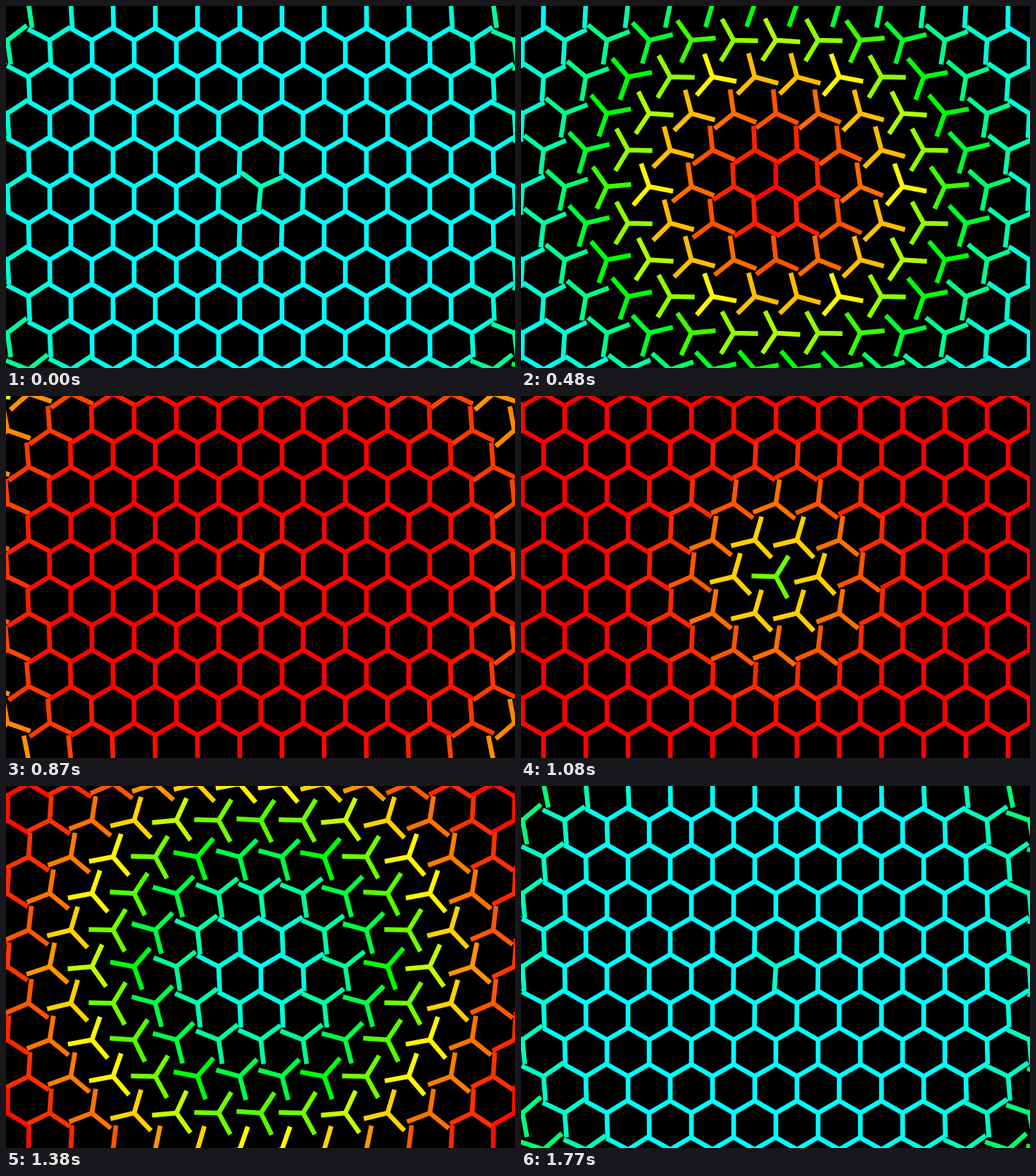
An HTML page with a canvas for the animation above (1800 ms loop, 699 by 497 pixels).

```html
<!DOCTYPE html>
<html lang="en">
<head>
<meta charset="utf-8">
<title>Hexagon wave</title>
<style>
  html, body { margin: 0; width: 100%; height: 100%; overflow: hidden; background: #000; }
  canvas { display: block; }
</style>
</head>
<body>
<canvas id="stage" width="699" height="497"></canvas>
<script>
const ctx = document.getElementById('stage').getContext('2d');
const W = 699, H = 497, CX = 350, CY = 248;
const GAP = 58, ROW = GAP * Math.sqrt(3) / 2, ARM = GAP / Math.sqrt(3);
const STEP = 30, STEPS = 60;
const START = 5.75;   // steps until the centre is halfway through its turn
const DELAY = 0.048;  // steps of lag per pixel from the centre

const ease = q => q < 0.5 ? 2 * q * q : 1 - 2 * (1 - q) * (1 - q);

const tripods = [];
for (let row = -6; row <= 6; row++) {
  const shift = row % 2 ? GAP / 2 : 0;
  for (let col = -8; col <= 8; col++) {
    const x = col * GAP + shift, y = row * ROW;
    tripods.push({ x, y, lag: START + DELAY * Math.hypot(x, y) });
  }
}

function drawTripod({ x, y, lag }, step) {
  const phase = 2 * Math.PI * (step - lag) / STEPS;
  const level = ease(0.5 + 0.5 * Math.sin(phase));
  const rising = Math.cos(phase) > 0;
  const turn = (rising ? level : 2 - level) * Math.PI / 3;

  ctx.strokeStyle = `hsl(${180 * (1 - level)}, 100%, 50%)`;
  ctx.beginPath();
  for (let i = 0; i < 3; i++) {
    const a = Math.PI / 2 + turn + i * 2 * Math.PI / 3;
    ctx.moveTo(CX + x, CY + y);
    ctx.lineTo(CX + x + ARM * Math.cos(a), CY + y + ARM * Math.sin(a));
  }
  ctx.stroke();
}

function draw(ms) {
  const step = Math.floor(ms / STEP) % STEPS;
  ctx.fillStyle = '#000';
  ctx.fillRect(0, 0, W, H);
  ctx.lineWidth = 6.5;
  for (const t of tripods) drawTripod(t, step);
}

const begin = performance.now();
function tick() {
  draw(performance.now() - begin);
  requestAnimationFrame(tick);
}
tick();
</script>
</body>
</html>
```
